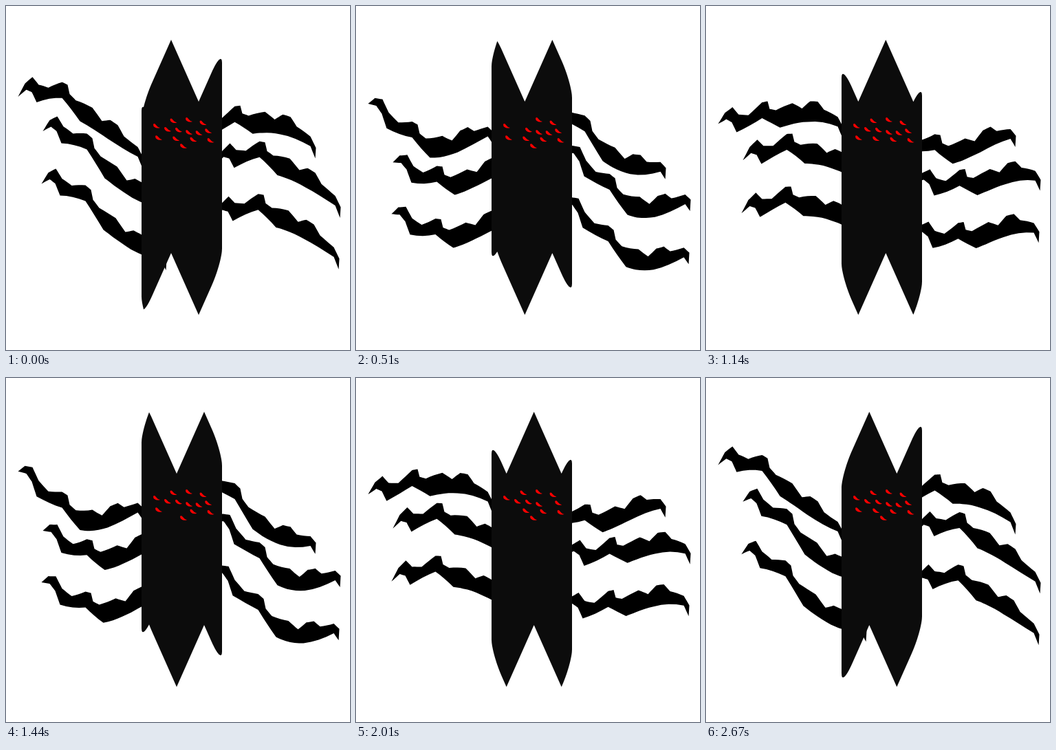
An HTML page with a canvas for the animation above (2.7 s loop, 500x500 px).

```html
<!DOCTYPE html>
<html lang="en">
<head>
<meta charset="utf-8">
<title>Creature</title>
<style>
  html, body { margin: 0; width: 100%; height: 100%; overflow: hidden; background: #fff; }
  canvas { display: block; width: 500px; height: 500px; }
</style>
</head>
<body>
<canvas id="stage" width="500" height="500"></canvas>
<script>
const ctx = document.getElementById('stage').getContext('2d');
const LOOP = 2700, WAVE = 900, STEP = 30;
const LEFT = 197, RIGHT = 314;
const { PI, cos, sqrt, min, max, abs, floor } = Math;

// Key points of a resting leg, relative to its left tip: upper edge, then lower edge back
const LEG = [
  [0, 0], [10, -14], [21, -18.5], [30, -4], [44, 4], [64, -3], [72, 0], [75, 13],
  [84, 20], [108, 21], [122, 33], [134, 24.5], [145, 25.5], [154, 36.5], [174, 42],
  [182, 54], [181, 70],
  [174, 56], [130, 54], [104, 51], [90, 48.5], [64, 20], [27, 20.5], [20, 3], [12, -4]
];
const TIPS = [[17.5, 143], [53.5, 208.4], [51.5, 284.4]];

// Rows of eyes: one blink slot per eye, and the place of eye i
const ROWS = [
  { slots: [2, 1, 0, 5], at: i => [219 + 25.5 * i - i * i, 165.7 + 3 * (i - 1.75) ** 2] },
  { slots: [1, 0, 5, 6, 7], at: i => [235 + 16.4 * i - 0.4 * i * i, 182.4 - 2.8 * cos(1.3 * i - 0.4)] },
  { slots: [6, 4, 7, 2], at: i => [222 + 25.2 * i, 192 + 1.3 * i] },
  { slots: [3], at: () => [258, 204] }
];
const EYE = new Path2D('M-5-3Q-3-5-1-2Q1 1 5 2.2Q0 3.6-3 1.2Q-5 0-5-3Z');
const TILT = 0.42;

const sway = (x, t) => -29.5 * cos(2 * PI * (t / WAVE + 0.1875 - (x - 18) / 312));

function drawLeg(x0, y0, t) {
  const cuts = 4;
  ctx.beginPath();
  LEG.forEach(([ax, ay], i) => {
    const [bx, by] = LEG[(i + 1) % LEG.length];
    for (let k = 0; k < cuts; k++) {
      const x = x0 + ax + (bx - ax) * k / cuts;
      ctx.lineTo(x, y0 + ay + (by - ay) * k / cuts + sway(x, t));
    }
  });
  ctx.fill();
}

// A rounded box whose columns are shifted by a travelling triangle wave
function drawBody(t) {
  const zigzag = x => {
    const q = (x - 240 - 80 * t / WAVE + 800) % 80;
    return 49 + 2.25 * min(q, 80 - q);
  };
  const corner = x => {
    const k = max(0, 1 - min(x - LEFT, RIGHT - x) / 15);
    return 20 * (1 - sqrt(1 - k * k));
  };
  ctx.beginPath();
  for (let x = LEFT; x <= RIGHT; x += 0.25) ctx.lineTo(x, zigzag(x) + corner(x));
  for (let x = RIGHT; x >= LEFT; x -= 0.25) ctx.lineTo(x, zigzag(x) + 310 - corner(x));
  ctx.fill();
}

function drawEye([x, y], slot, t) {
  const blink = 240 + 300 * slot;
  const open = min(1, max(0, (abs(t - blink) - 30) / 90));
  ctx.save();
  ctx.translate(x, y);
  ctx.rotate(TILT);
  ctx.scale(1, open);
  ctx.rotate(-TILT);
  ctx.fill(EYE);
  ctx.restore();
}

function render(now) {
  const t = floor((now % LOOP) / STEP) * STEP;
  ctx.fillStyle = '#fff';
  ctx.fillRect(0, 0, 500, 500);
  ctx.fillStyle = '#000';
  for (const [x, y] of TIPS) {
    drawLeg(x, y, t);
    drawLeg(x + 251, y + 18.5, t);
  }
  ctx.fillStyle = '#0c0c0c';
  drawBody(t);
  ctx.fillStyle = '#f00';
  for (const { slots, at } of ROWS) slots.forEach((slot, i) => drawEye(at(i), slot, t));
}

const start = performance.now();
function tick() {
  render(performance.now() - start);
  requestAnimationFrame(tick);
}
tick();
</script>
</body>
</html>
```
